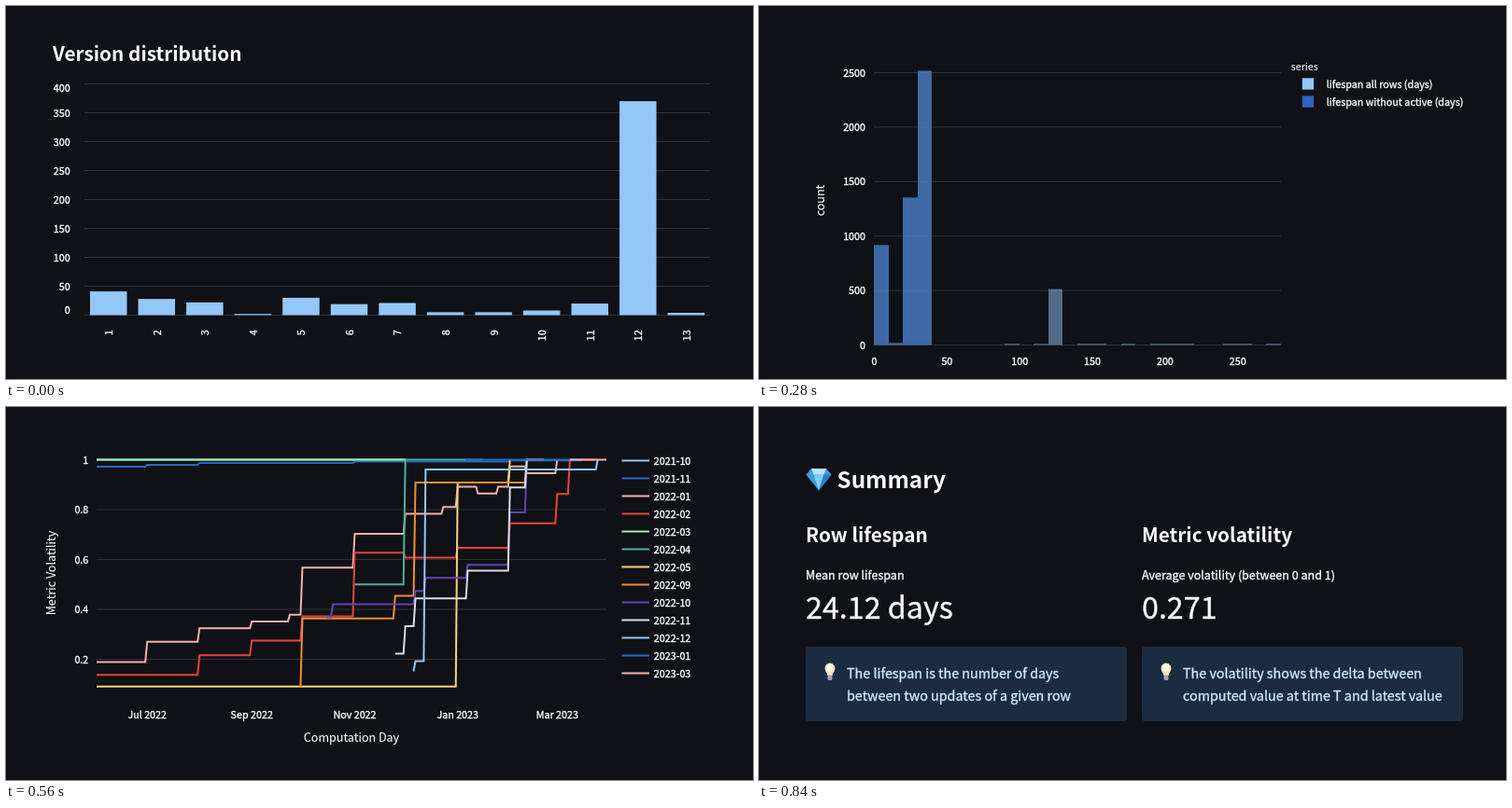
These frames come from a looping animation (800 by 400 pixels, 1.12 s). An HTML page:

```html
<!DOCTYPE html>
<html lang="en">
<head>
<meta charset="utf-8">
<title>Dashboard slides</title>
<style>
html, body { margin: 0; width: 100%; height: 100%; overflow: hidden; background: #0f1116; }
svg { display: block; width: 800px; height: 400px; }
text {
  font-family: "Noto Sans CJK SC", "Noto Sans CJK JP", "Noto Sans CJK TC", "Noto Sans CJK KR", "Noto Sans CJK", sans-serif;
  white-space: pre;
}
</style>
</head>
<body>
<svg id="stage" viewBox="0 0 800 400"></svg>
<script>
const C = {
  sky: '#93c7fa', blue: '#2b66c2', pink: '#f2b0ad', red: '#e8433a', mint: '#99eca7', teal: '#54ad9d',
  yellow: '#f8d377', orange: '#ef8d36', purple: '#6443b6', white: '#d9dce5',
  ink: '#fafafa', grid: '#303238', note: '#cbe7fc'
};
const SLIDE_MS = 280;

// Latin glyphs in the CJK face are drawn larger per em, and its bold is wider.
function text(x, y, str, { size = 12, bold = false, anchor = 'start', fill = C.ink, turn = false, thicken = 0.35 } = {}) {
  const px = (size * (bold ? 0.866 : 0.8955)).toFixed(2);
  const rotate = turn ? ` transform="rotate(-90 ${x} ${y})"` : '';
  const stroke = bold ? '' : ` stroke="${fill}" stroke-width="${thicken}"`;
  return `<text x="${x}" y="${y}" font-size="${px}" font-weight="${bold ? 700 : 400}" text-anchor="${anchor}" fill="${fill}"${stroke}${rotate}>${str}</text>`;
}

const axisTitle = (x, y, str, turn = false) =>
  text(x, y, str, { size: 14, anchor: 'middle', turn, thicken: 0.1 });
const rect = (x, y, w, h, fill, extra = '') =>
  `<rect x="${x}" y="${y}" width="${w}" height="${h}" fill="${fill}" ${extra}/>`;
const line = (x1, x2, y, color, width = 1) =>
  `<path d="M${x1} ${y}H${x2}" stroke="${color}" stroke-width="${width}"/>`;
const poly = (points, fill) => `<polygon points="${points}" fill="${fill}"/>`;
const each = (n, fn) => Array.from({ length: n }, (_, i) => fn(i)).join('');

function versions() {
  const counts = [41, 28, 22, 2, 30, 19, 21, 5, 5, 8, 20, 370, 4];
  const base = 331.5, unit = 0.62;
  return text(50, 58.5, 'Version distribution', { size: 24, bold: true }) +
    each(9, i => {
      const y = base - 31 * i;
      const labelY = Math.min(Math.max(y, 87.5), 325.5) + 4;
      return line(84, 754, y, C.grid) + text(68.7, labelY, 50 * i, { anchor: 'end' });
    }) +
    counts.map((count, i) => {
      const x = 90 + 51.55 * i, h = count * unit;
      return rect(x, base - h, 39.5, h, C.sky) +
        text(x + 24.2, 347.3, i + 1, { anchor: 'end', turn: true });
    }).join('');
}

function lifespans() {
  const base = 363.5, unit = 0.1168;
  const edge = bin => Math.round(123 + 15.57 * bin);
  const bar = (bin, count, color) =>
    rect(edge(bin), base - count * unit, edge(bin + 1) - edge(bin), count * unit, color, 'opacity=".5"');
  const main = [917, 17, 1353, 2517];
  const strays = [9, 11, 14, 15, 17, 19, 20, 21, 24, 25, 27];
  return each(6, i => {
      const y = base - 500 * i * unit;
      return line(123, 559, y, C.grid) + text(114, y + 4, 500 * i, { anchor: 'end' });
    }) +
    main.map((count, bin) => bar(bin, count, C.sky) + bar(bin, count, C.blue)).join('') +
    bar(12, 514, C.sky) + strays.map(bin => bar(bin, 10, C.sky)).join('') +
    each(6, i => text(123.5 + 77.85 * i, 384.6, 50 * i, { anchor: 'middle' })) +
    axisTitle(70, 208.5, 'count', true) +
    text(569.7, 69, 'series', { thicken: 0.1 }) +
    ['lifespan all rows (days)', 'lifespan without active (days)'].map((label, i) =>
      rect(581.8, 77.3 + 19 * i, 12.3, 12.3, i ? C.blue : C.sky) + text(607.8, 88.3 + 19 * i, label)).join('');
}

const DAY = 864e5;
const firstOf = month => Date.UTC(2022, 5 + month, 1);
function dateX(month) {
  const whole = Math.floor(month);
  const days = (firstOf(whole) - firstOf(0)) / DAY + 30 * (month - whole);
  return Math.min(643, 97 + 1.807 * days);
}

// One level per month, out of `total`; a nested list spreads its levels evenly over the month.
function staircase(total, from, months) {
  const levelY = level => (324 - 267.4 * level / total).toFixed(1);
  const start = Math.floor(from);
  let path = '', last;
  months.forEach((month, i) => [month].flat().forEach((level, k, parts) => {
    const x = dateX(start + i + k / parts.length), y = levelY(level);
    if (x <= dateX(from)) path = `M${dateX(from)} ${y}`;
    else path += level === last ? `H${x}` : `H${x - 2}L${x} ${y}`;
    last = level;
  }));
  return path;
}

function volatility() {
  const flat = n => Array(n).fill(1);
  // name, colour, final total, first month counted from June, levels
  const series = [
    ['2021-10', C.sky, 1, 0, flat(7)],
    ['2021-11', C.blue, 400, 0, [389, 392, 395, 395, 395, 397, 397, 397, 399, [399, 399]]],
    ['2022-01', C.pink, 37, 0, [7, 10, 12, [13, 13, 13, 14], 21, 26, [29, 29, 29, 30], [33, 33, 32, 32, 33], [36, 35, 35], 37]],
    ['2022-02', C.red, 51, 0, [7, 7, 11, 14, 19, 32, 31, 33, 38, [44, 51, 51, 51]]],
    ['2022-03', C.mint, 1, 0, flat(7)],
    ['2022-04', C.teal, 2, 5, [1, 2, [2, 2]]],
    ['2022-05', C.yellow, 11, 0, [...flat(7), 10, 11]],
    ['2022-09', C.orange, 11, 3.95, [1, 4, [4, 4, 4, 4, 5], [5, 10, 10, 10, 10], 10, [10, 11, 11]]],
    ['2022-10', C.purple, 19, 4.47, [[7, 7, 7, 8, 8], 8, [8, 9, 10, 10, 10], [10, 11, 11, 11, 11], [15, 19, 19]]],
    ['2022-11', C.white, 9, 5.8, [2, [3, 4, 4, 4, 4], [4, 5, 5, 5, 5], [8, 9, 9]]],
    ['2022-12', C.sky, 26, 6.16, [[4, 5, 25, 25, 25], 25, 25, [25, 25, 25, 25, 26]]],
    ['2023-01', C.blue, 1, 7.15, [1, 1, [1, 1]]],
    ['2023-03', C.pink, 1, 9.25, [1, 1]]
  ];
  const monthName = month => new Date(firstOf(month))
    .toLocaleString('en-US', { month: 'short', year: 'numeric', timeZone: 'UTC' });
  return each(5, i => {
      const y = 56.5 + 53.5 * i;
      return line(97, 643, y, C.grid) + text(88.3, y + 4, +(1 - 0.2 * i).toFixed(1), { anchor: 'end' });
    }) +
    series.map(([, color, ...steps]) =>
      `<path d="${staircase(...steps)}" fill="none" stroke="${color}" stroke-width="2"/>`).join('') +
    each(5, i => text(dateX(1 + 2 * i), 334.3, monthName(1 + 2 * i), { anchor: 'middle' })) +
    axisTitle(370, 359, 'Computation Day') +
    axisTitle(53, 178, 'Metric Volatility', true) +
    series.map(([name, color], i) =>
      line(659.5, 689, 57.5 + 19 * i, color, 2) + text(693.8, 62 + 19 * i, name)).join('');
}

const gem = () =>
  poly('56,66 72,66 77.6,72.5 64,89.5 50.4,72.5', '#3f9fd8') +
  poly('56,66 72,66 69.5,72.5 58.5,72.5', '#b4e5fb') +
  poly('58.5,72.5 69.5,72.5 64,89.5', '#7fcdf5') +
  poly('69.5,72.5 77.6,72.5 64,89.5', '#2c82c4');

const bulb = x =>
  `<path d="M${x - 2.6} 288C${x - 2.6} 285 ${x - 5.4} 284 ${x - 5.4} 280A5.4 5.4 0 0 1 ${x + 5.4} 280C${x + 5.4} 284 ${x + 2.6} 285 ${x + 2.6} 288Z" fill="#f9e6b8"/>` +
  `<ellipse cx="${x}" cy="279.8" rx="3.4" ry="3.8" fill="#fff8e4"/>` +
  rect(x - 2.5, 287.5, 5, 5.5, '#a3a5a8', 'rx="1.4"');

function summaryCard(x, heading, label, value, notes) {
  return text(x, 145, heading, { size: 24, bold: true }) +
    text(x, 184.8, label, { size: 14 }) +
    text(x, 227.2, value, { size: 36 }) +
    rect(x, 257, 344, 80, '#1b2c41', 'rx="4"') + bulb(x + 26) +
    notes.map((note, i) => text(x + 44, 290.6 + 24 * i, note, { size: 16, fill: C.note })).join('');
}

function summary() {
  return gem() + text(83.5, 87, 'Summary', { size: 28, bold: true }) +
    summaryCard(50, 'Row lifespan', 'Mean row lifespan', '24.12 days',
      ['The lifespan is the number of days', 'between two updates of a given row']) +
    summaryCard(410, 'Metric volatility', 'Average volatility (between 0 and 1)', '0.271',
      ['The volatility shows the delta between', 'computed value at time T and latest value']);
}

const stage = document.getElementById('stage');
stage.innerHTML = [versions, lifespans, volatility, summary].map(draw => `<g>${draw()}</g>`).join('');
const slides = [...stage.querySelectorAll('g')];

function show() {
  const current = Math.floor(performance.now() / SLIDE_MS) % slides.length;
  slides.forEach((slide, i) => { slide.style.display = i === current ? '' : 'none'; });
  requestAnimationFrame(show);
}
show();
</script>
</body>
</html>
```
